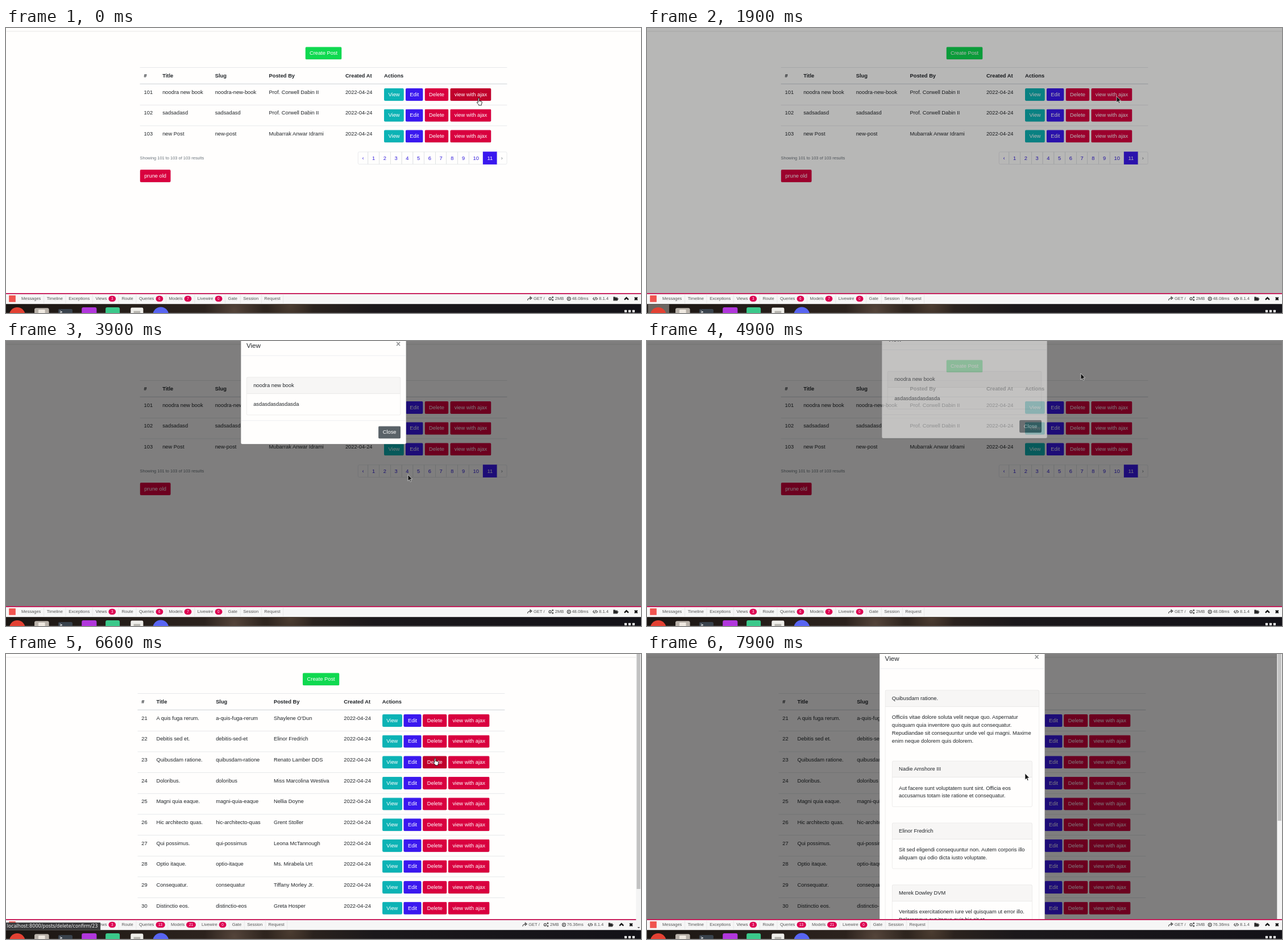
Write an HTML page that moves like this. It is 1117x501 px and loops after 8000 ms.

```html
<!DOCTYPE html>
<html lang="en">
<head>
<meta charset="utf-8">
<title>Posts</title>
<style>
html, body { margin: 0; width: 100%; height: 100%; overflow: hidden; background: #fffefd; }
#stage { position: absolute; width: 1920px; height: 861px; overflow: hidden; transform: scale(.58177); transform-origin: 0 0;
  font: 16px/24px "Liberation Sans", Arial, sans-serif; color: #212529; white-space: nowrap; }
#stage * { box-sizing: border-box; }
.abs, .page, .row, .row > span, .modal, #bar i, #bar svg, #tasks i { position: absolute; }
#nav { left: 0; top: -50px; width: 1920px; height: 59px; box-shadow: 0 2px 4px rgba(0,0,0,.14); }
.page { left: 0; top: 0; width: 1110px; height: 801px; }
.btn { display: inline-block; vertical-align: top; padding: 6px 12px; border: 1px solid transparent; border-radius: 4px; color: #fff;
  box-shadow: inset 0 1px 0 rgba(255,255,255,.15), 0 1px 1px rgba(0,0,0,.075); }
.green { background: #0fd950; } .teal { background: #0cb3b5; } .blue { background: #3a18ef; }
.red { background: #d9003f; } .grey { background: #5a6268; }
.teal.hot { background: #0a9698; } .blue.hot { background: #2f10d2; } .red.hot { background: #c0002b; }
.row { width: 1110px; height: 63px; border-top: 1px solid #d5d9dd; }
.row > span { top: 12px; }
.head { top: 119px; height: 51px; border-bottom: 2px solid #d5d9dd; font-weight: bold; }
.pager { right: 0; top: 374px; display: flex; }
.pager b { padding: 8px 12px; margin-left: -1px; border: 1px solid #d9dde1; font-weight: normal; line-height: 20px; color: #3420dc; }
.pager b.hot { background: #e9ecef; }
.pager b.on { background: #3a18ef; border-color: #3a18ef; color: #fff; }
.pager b:first-child { border-radius: 4px 0 0 4px; }
.pager b:last-child { border-radius: 0 4px 4px 0; color: #6c757d; }
#dim { left: 0; top: 0; width: 1920px; height: 801px; background: #000; }
.modal { top: -19px; width: 500px; background: #fffefd; border: 1px solid rgba(0,0,0,.2); border-radius: 5px; }
.modal h5 { margin: 0; height: 63px; padding: 16px; font: 20px/30px "Liberation Sans", Arial, sans-serif; border-bottom: 1px solid #dee2e6; }
.modal h5 b { position: absolute; right: 16px; top: 16px; font-size: 24px; line-height: 24px; opacity: .5; }
.content { padding: 64px 16px 16px; }
.card { border: 1px solid rgba(0,0,0,.125); border-radius: 4px; }
.card .card { margin-top: 48px; }
.card h6 { margin: 0; padding: 12px 20px; font: inherit; background: rgba(0,0,0,.03); border-bottom: 1px solid rgba(0,0,0,.125); }
.card > div { padding: 20px; }
.foot { padding: 16px; text-align: right; border-top: 1px solid #dee2e6; }
.scroll { left: 1905px; top: 0; width: 15px; height: 834px; background: #f4f4f4; }
.scroll::before { content: ""; position: absolute; left: 2px; width: 11px; height: var(--thumb); background: #c1c1c1; }
.scroll::after { content: ""; position: absolute; left: 4px; bottom: 5px; border: 4px solid transparent; border-top-color: #555; border-bottom: 0; }
#bar { left: 0; top: 801px; width: 1920px; height: 33px; background: #f6f6f6; border-top: 3px solid #c3084c; font-size: 13px; line-height: 28px; color: #555; }
#tabs { left: 38px; display: flex; }
#tabs span { padding: 0 8.3px; border-right: 1px solid #e0e0e0; }
#tabs b { display: inline-block; margin-left: 5px; padding: 0 8px; border-radius: 9px; background: #dd0052; color: #fff; font: 11px/18px "Liberation Sans", Arial, sans-serif; }
#bar i { font-style: normal; }
#bar svg { top: 6px; width: 16px; height: 16px; fill: none; stroke: #444; stroke-width: 2; }
#bar svg.solid { fill: #222; }
#bar svg.thick { stroke: #111; stroke-width: 4; }
#status { left: 0; top: 811px; height: 23px; padding: 0 7px 0 3px; background: #3b3b3d; color: #f2f2f2; border: 1px solid #555; border-left: 0; border-radius: 0 3px 0 0;
  font: 14px/21px "DejaVu Sans", sans-serif; }
#tasks { left: 0; top: 834px; width: 1920px; height: 27px; overflow: hidden;
  background: radial-gradient(circle at 690px 20px, #54443a, transparent 90px), radial-gradient(circle at 860px 4px, #4b3c31, transparent 70px),
  linear-gradient(90deg, #1b1613, #2b221d 30%, #30261f 45%, #1b181b 58%, #131218); }
#cursor { position: absolute; left: 0; top: 0; width: 16px; height: 16px; overflow: visible; pointer-events: none; }
</style>
</head>
<body>
<div id="stage"></div>
<svg id="cursor">
  <path id="arrow" fill="#111" stroke="#eee" stroke-width=".7" d="M0 0V11L2.6 8.7 4.3 12.4 6 11.7 4.3 8 7.6 7.8Z"/>
  <path id="hand" transform="translate(-3 -2)" fill="#fff" stroke="#111" stroke-width=".9" d="M2.4 1.2q0-1 1-1t1 1v4l3.6.8q1.5.4 1.3 2l-.9 3.4v1.4H3.4v-1.2L.6 8.6q-.6-1 .3-1.4t1.5.8z"/>
</svg>
<script>
const $ = id => document.getElementById(id);
const btn = (color, text) => `<a class="btn ${color}">${text}</a>`;
const actions = [btn('teal', 'View'), btn('blue', 'Edit'), btn('red', 'Delete'), btn('red', 'view with ajax')].join(' ');
const slug = s => s.toLowerCase().replace(/\./g, '').replace(/ /g, '-');
const cells = (cols, list) => list.map((s, i) => `<span style="left:${cols[i]}px">${s}</span>`).join('');

function page(id, left, cols, first, posts, extra = '') {
  const rows = posts.map(([title, author], i) =>
    `<div class="row" style="top:${169 + 63 * i}px">${cells(cols, [first + i, title, slug(title), author, '2022-04-24', actions])}</div>`);
  const head = cells(cols, ['#', 'Title', 'Slug', 'Posted By', 'Created At', 'Actions']);
  return `<div class="page" id="${id}" style="left:${left}px">
    <div class="abs" style="top:57px;width:1110px;text-align:center">${btn('green', 'Create Post')}</div>
    ${rows.join('')}<div class="row head">${head}</div>${extra}</div>`;
}

const card = (title, body) => `<div class="card"><h6>${title}</h6><div>${body}</div></div>`;
const modal = (id, left, body) => `<div class="modal" id="${id}" style="left:${left}px"><h5>View<b>×</b></h5>
  <div class="content">${body}</div><div class="foot">${btn('grey', 'Close')}</div></div>`;

const pages = ['‹', 1, 2, 3, 4, 5, 6, 7, 8, 9, 10, 11, '›'];
const footer = `<small class="abs" style="top:381px;font-size:12.8px;color:#6c757d">Showing 101 to 103 of 103 results</small>
  <div class="abs pager">${pages.map(p => `<b class="${p === 11 ? 'on' : ''}">${p}</b>`).join('')}</div>
  <div class="abs" style="top:428px">${btn('red', 'prune old')}</div>`;

const lastPage = page('last', 405, [12, 68, 227, 390, 621, 738], 101, [
  ['noodra new book', 'Prof. Corwell Dabin II'],
  ['sadsadasd', 'Prof. Corwell Dabin II'],
  ['new Post', 'Mubarrak Anwar Idrami']], footer);

const thirdPage = page('third', 397.5, [12, 57, 237, 412, 624, 740], 21, [
  ['A quis fuga rerum.', "Shaylene O'Dun"],
  ['Debitis sed et.', 'Elinor Fredrich'],
  ['Quibusdam ratione.', 'Renato Lamber DDS'],
  ['Doloribus.', 'Miss Marcolina Westiva'],
  ['Magni quia eaque.', 'Nellia Doyne'],
  ['Hic architecto quas.', 'Grent Stoller'],
  ['Qui possimus.', 'Leona McTannough'],
  ['Optio itaque.', 'Ms. Mirabela Urt'],
  ['Consequatur.', 'Tiffany Morley Jr.'],
  ['Distinctio eos.', 'Greta Hosper']]);

const longPost = card('Quibusdam ratione.',
  `Officiis vitae dolore soluta velit neque quo. Aspernatur<br>quisquam quia inventore quo quis aut consequatur.<br>
  Repudiandae sit consequuntur unde vel qui magni. Maxime<br>enim neque dolorem quis dolorem.` +
  card('Nadie Amshore III', 'Aut facere sunt voluptatem sunt sint. Officia eos<br>accusamus totam iste ratione et consequatur.') +
  card('Elinor Fredrich', 'Sit sed eligendi consequuntur non. Autem corporis illo<br>aliquam qui odio dicta iusto voluptate.') +
  card('Merek Dowley DVM', 'Veritatis exercitationem iure vel quisquam ut error illo.<br>Doloremque aut itaque quis hic sit et.'));

const tab = (name, id, n) => `<span>${name}${id ? `<b id="${id}">${n}</b>` : ''}</span>`;
const tabs = tab('Messages') + tab('Timeline') + tab('Exceptions') + tab('Views', 'views', 3) + tab('Route') +
  tab('Queries', 'queries', 6) + tab('Models', 'models', 7) + tab('Livewire', 'live', 0) + tab('Gate') + tab('Session') + tab('Request');
const icon = (x, d, kind = '') => `<svg class="${kind}" viewBox="0 0 16 16" style="left:${x}px"><path d="${d}"/></svg>`;
const label = (x, s, id = '') => `<i id="${id}" style="left:${x}px">${s}</i>`;
const ring = (x, y, r) => `M${x - r} ${y}a${r} ${r} 0 1 0 ${2 * r} 0a${r} ${r} 0 1 0 ${-2 * r} 0`;
const tools = icon(1576, 'M1 13Q2 6 10 6M9 2l5 4-5 4z') + label(1595, 'GET /') +
  icon(1640, ring(5, 8, 3.5) + ring(13, 4, 1.5) + ring(13, 12, 1.5)) + label(1660, '2MB') +
  icon(1695, ring(7, 8, 5) + 'M7 5v4H5') + label(1711, '', 'ms') +
  icon(1774, 'M4 4L1 8l3 4M9 3L6 13M11 4l3 4-3 4') + label(1793, '8.1.4') +
  icon(1836, 'M1 13V3h4l2 2h5v3h3l-3 5z', 'solid') + icon(1868, 'M2 11l6-6 6 6', 'thick') + icon(1898, 'M3 4l8 8M11 4l-8 8', 'thick');

const tile = (x, y, w, color, r = 5, text = '') =>
  `<i style="left:${x}px;top:${y}px;width:${w}px;height:${w}px;border-radius:${r}px;background:${color};color:#fff;font:bold 14px/18px 'DejaVu Sans Mono',monospace;padding-left:4px">${text}</i>`;
const tasks = '<i id="glow" style="left:3px;top:0;width:64px;height:27px;background:#6b6661"></i>' +
  tile(10, 10, 48, '#e34133', 24) + tile(86, 12, 44, '#b9b2aa') + tile(98, 17, 20, '#eee8e0', 2) +
  tile(158, 15, 43, '#39424c', 4, '&gt;_') + tile(229, 10, 45, '#b137dc') + tile(301, 10, 43, '#3bc98b') +
  tile(377, 11, 38, '#efeeea', 4) + tile(386, 21, 20, '#b8b6b0', 0) + tile(444, 9, 48, '#5865f2', 24) +
  [0, 12, 24].map(d => tile(1870 + d, 18, 7, '#fff', 1)).join('');

$('stage').innerHTML = `<div class="abs" id="nav"></div>${lastPage}${thirdPage}
  <div class="abs scroll" id="pageScroll" style="--thumb:710px;z-index:3"></div>
  <div class="abs" id="dim"></div>
  ${modal('short', 710, card('noodra new book', 'asdasdasdasdasda'))}${modal('long', 702.5, longPost)}
  <div class="abs scroll" id="modalScroll" style="--thumb:504px"></div>
  <div class="abs" id="bar"><i style="left:9px;top:4px;width:20px;height:20px;background:#f0544f"></i>
    <div class="abs" id="tabs">${tabs}</div><div class="abs" id="tools">${tools}</div></div>
  <div class="abs" id="status" style="z-index:4"></div><div class="abs" id="tasks">${tasks}</div>`;

// Pointer path: time, x, y
const path = [[0, 831, 125], [100, 833, 126], [500, 833, 126], [800, 826, 120], [2300, 826, 120], [2400, 712, 183], [2500, 685, 169],
  [2700, 685, 169], [3100, 664, 166], [3300, 664, 166], [3500, 684, 162], [3700, 662, 167], [3800, 662, 167], [3900, 707, 235],
  [4100, 707, 235], [4300, 690, 195], [4700, 763, 57], [4900, 763, 57], [5100, 720, 180], [5400, 705, 223], [5500, 705, 223],
  [5800, 686, 228], [6000, 686, 228], [6600, 754.5, 185], [6800, 812, 189], [7500, 812, 189], [7600, 719, 196], [7800, 719, 196], [7900, 665, 210]];

const ramp = (t, a, len) => Math.min(1, Math.max(0, (t - a) / len));
const ease = p => Math.sin(p * Math.PI / 2);
const show = (id, on) => $(id).style.display = on ? '' : 'none';
const within = (t, a, b) => t >= a && t < b;

function pointer(t) {
  const i = path.findIndex(k => k[0] > t);
  if (i < 0) return path.at(-1).slice(1);
  const [a, b] = [path[i - 1], path[i]], p = (t - a[0]) / (b[0] - a[0]);
  return [1, 2].map(n => a[n] + (b[n] - a[n]) * p);
}

function pose(id, t, open, close, loaded) {
  const fade = ramp(t, open, 150) - ramp(t, close, 150);
  const slide = ease(ramp(t, open, 300)) - ease(ramp(t, close, 300));
  const el = $(id);
  show(id, fade > 0);
  el.style.opacity = fade;
  el.style.transform = `translateY(${-50 * (1 - slide)}px)`;
  el.querySelector('.card').style.display = t >= loaded ? '' : 'none';
}

let hot;
function draw(t) {
  const next = t >= 6100, modalOpen = t >= 7000;
  show('last', !next);
  show('third', next);
  show('pageScroll', next && !modalOpen);
  show('modalScroll', t >= 7500);
  $('tools').style.left = next && !modalOpen ? '-15px' : '0';
  $('queries').textContent = next ? 13 : 6;
  $('models').textContent = next ? 21 : 7;
  $('ms').textContent = next ? '76.36ms' : '48.08ms';

  const dim = ramp(t, 1815, 150) - ramp(t, 4960, 130) + ramp(t, 6930, 150);
  show('dim', dim > 0);
  $('dim').style.opacity = dim / 2;
  pose('short', t, 1965, 4830, 2400);
  pose('long', t, 7080, 9000, 7500);

  const paging = within(t, 5600, 6100);
  show('status', paging || within(t, 6500, 6800));
  $('status').textContent = 'localhost:8000/posts' + (paging ? '?page=3' : '/delete/confirm/23');
  show('glow', within(t, 1700, 2200));

  const [x, y] = pointer(t);
  hot?.classList.remove('hot');
  hot = document.elementFromPoint(x, y)?.closest('.btn, .pager b');
  hot?.classList.add('hot');
  show('hand', hot);
  show('arrow', !hot);
  $('cursor').style.transform = `translate(${x}px, ${y}px)`;
}

function tick() {
  draw(Math.floor(performance.now() % 8000 / 100) * 100);
  requestAnimationFrame(tick);
}
tick();
</script>
</body>
</html>
```
